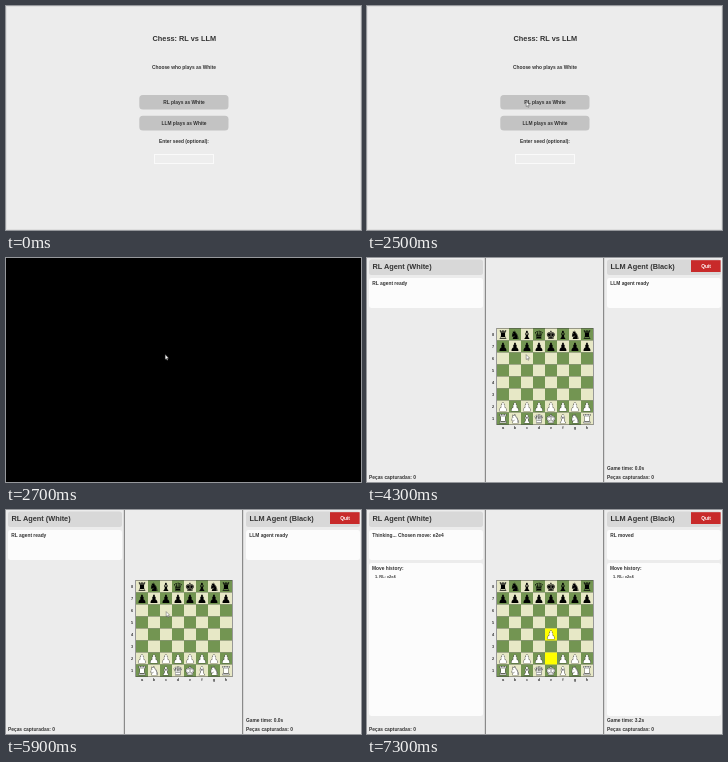
These frames come from a looping animation (355 by 224 pixels, 8000 ms). An HTML page:

```html
<!DOCTYPE html>
<html lang="en">
<head>
<meta charset="utf-8">
<title>Chess: RL vs LLM</title>
<style>
  html, body { margin: 0; width: 100%; height: 100%; overflow: hidden; background: #ececec; }
  svg { display: block; width: 355px; height: 224px; }
  text { font: bold 4.87px "Liberation Sans", Arial, sans-serif; fill: #333; }
  .mid { text-anchor: middle; }
  .big { font-size: 7.35px; }
  .small { font-size: 3.9px; }
  .piece { font: 11.5px "DejaVu Sans", sans-serif; text-anchor: middle; fill: #000; }
  .white { fill: #fff; stroke: #333; stroke-width: .7px; paint-order: stroke; }
</style>
</head>
<body>
<svg id="stage" viewBox="0 0 355 224"></svg>
<script>
const LOOP = 8000, SQ = 12, LEFT = 130, TOP = 70.5;
const stage = document.getElementById('stage');

function add(parent, tag, attrs = {}, content = '') {
  const el = document.createElementNS('http://www.w3.org/2000/svg', tag);
  for (const k in attrs) el.setAttribute(k, attrs[k]);
  el.textContent = content;
  return parent.appendChild(el);
}
const group = parent => add(parent, 'g');
const box = (g, x, y, width, height, fill, rx = 0, more = {}) =>
  add(g, 'rect', { x, y, width, height, fill, rx, ...more });
const label = (g, x, y, s, cls = '') => add(g, 'text', { x, y, class: cls }, s);
const show = (el, on) => el.setAttribute('display', on ? 'inline' : 'none');

// Menu
const menu = group(stage);
box(menu, .5, .5, 354, 223, '#ececec', 0, { stroke: '#dedede' });
label(menu, 178.3, 35, 'Chess: RL vs LLM', 'mid big');
label(menu, 178, 62.7, 'Choose who plays as White', 'mid');
['RL', 'LLM'].forEach((who, i) => {
  box(menu, 133.3, 89 + i * 20.8, 89.2, 14.6, '#c3c3c3', 3.5);
  label(menu, 178, 97.9 + i * 20.8, who + ' plays as White', 'mid');
});
label(menu, 178, 137.3, 'Enter seed (optional):', 'mid');
box(menu, 148.5, 148.5, 59, 9, '#eeeeee', 0, { stroke: '#fafafa' });

// Loading
const dark = group(stage);
box(dark, 0, 0, 355, 224, '#000');

// Game
const game = group(stage);
box(game, 0, 0, 355, 224, '#ececec');
for (const i of [1, 2]) box(game, 355 / 3 * i - .5, 0, 1, 224, '#777');

const history = group(game);
function panel(x, title) {
  box(game, x + 2, 1.5, 114, 15.5, '#d8d8d8', 2.5);
  label(game, x + 5.5, 11.4, title, 'big');
  box(game, x + 2, 20, 114, 30, '#fcfcfc', 2.5);
  label(game, x + 2, 220.6, 'Peças capturadas: 0');
  box(history, x + 2, 53, 114, 153, '#fcfcfc', 2.5);
  label(history, x + 5, 60, 'Move history:');
  label(history, x + 8, 68.3, '1. RL: e2e4', 'small');
  return label(game, x + 5.3, 27.2, '');
}
const rlText = panel(0, 'RL Agent (White)');
const llmText = panel(238, 'LLM Agent (Black)');
const clock = label(game, 240, 211.6, '');
box(game, 324, 2.2, 29.6, 11.8, '#c82a2a');
label(game, 339, 10, 'Quit', 'mid').style.fill = '#fff';

// Board
box(game, LEFT - .5, TOP - .5, SQ * 8 + 1, SQ * 8 + 1, '#444');
const square = (g, c, r, fill) => box(g, LEFT + c * SQ, TOP + r * SQ, SQ, SQ, fill);
for (let i = 0; i < 64; i++) {
  const c = i % 8, r = i >> 3;
  square(game, c, r, (c + r) % 2 ? '#739552' : '#e7e8c6');
}
const marks = group(game);
square(marks, 4, 4, '#ffff00');
square(marks, 4, 6, '#ffff00');

const piece = (c, r, glyph, cls) =>
  label(game, LEFT + (c + .5) * SQ, TOP + r * SQ + 10.2, glyph + '\uFE0E', 'piece ' + cls);
let pawn;
[...'♜♞♝♛♚♝♞♜'].forEach((glyph, c) => {
  piece(c, 0, glyph, '');
  piece(c, 1, '♟', '');
  const p = piece(c, 6, '♟', 'white');
  if (c === 4) pawn = p;
  piece(c, 7, glyph, 'white');
  label(game, LEFT + (c + .5) * SQ, TOP + 100.5, 'abcdefgh'[c], 'mid small');
  label(game, 126, TOP + c * SQ + 7.6, 8 - c, 'mid small');
});

// Pointer stops: time, x, y
const stops = [
  [500, 200, 192], [700, 195, 197], [900, 181, 162], [1100, 179, 158], [1300, 178, 157],
  [1500, 173, 145], [1700, 166, 128], [1900, 160, 116], [2100, 158, 106], [2300, 158, 97],
  [2500, 159, 96], [2700, 159, 97], [5900, 160, 102], [6100, 182, 140], [6300, 182, 153],
  [6500, 280, 216]
];
const pointer = add(stage, 'path', {
  d: 'M.2 -.4V4.5L1.3 3.6 2 5.3 2.9 4.9 2.2 3.2H3.7Z',
  fill: '#fff', stroke: '#333', 'stroke-width': .4
});

function draw(t) {
  const chosen = t >= 6300, moved = t >= 7300;
  show(menu, t < 2700);
  show(dark, t >= 2700 && t < 4300);
  show(game, t >= 4300);
  show(history, chosen);
  show(marks, moved);
  rlText.textContent = chosen ? 'Thinking... Chosen move: e2e4' : 'RL agent ready';
  llmText.textContent = moved ? 'RL moved' : 'LLM agent ready';
  clock.textContent = `Game time: ${moved ? '3.2' : chosen ? '2.2' : '0.0'}s`;
  pawn.setAttribute('y', TOP + (moved ? 4 : 6) * SQ + 10.2);

  const stop = stops.filter(s => s[0] <= t).pop();
  show(pointer, stop && t < 6700);
  if (stop) pointer.setAttribute('transform', `translate(${stop[1]} ${stop[2]})`);
}

const start = performance.now();
function tick() {
  draw((performance.now() - start) % LOOP);
  requestAnimationFrame(tick);
}
tick();
</script>
</body>
</html>
```
